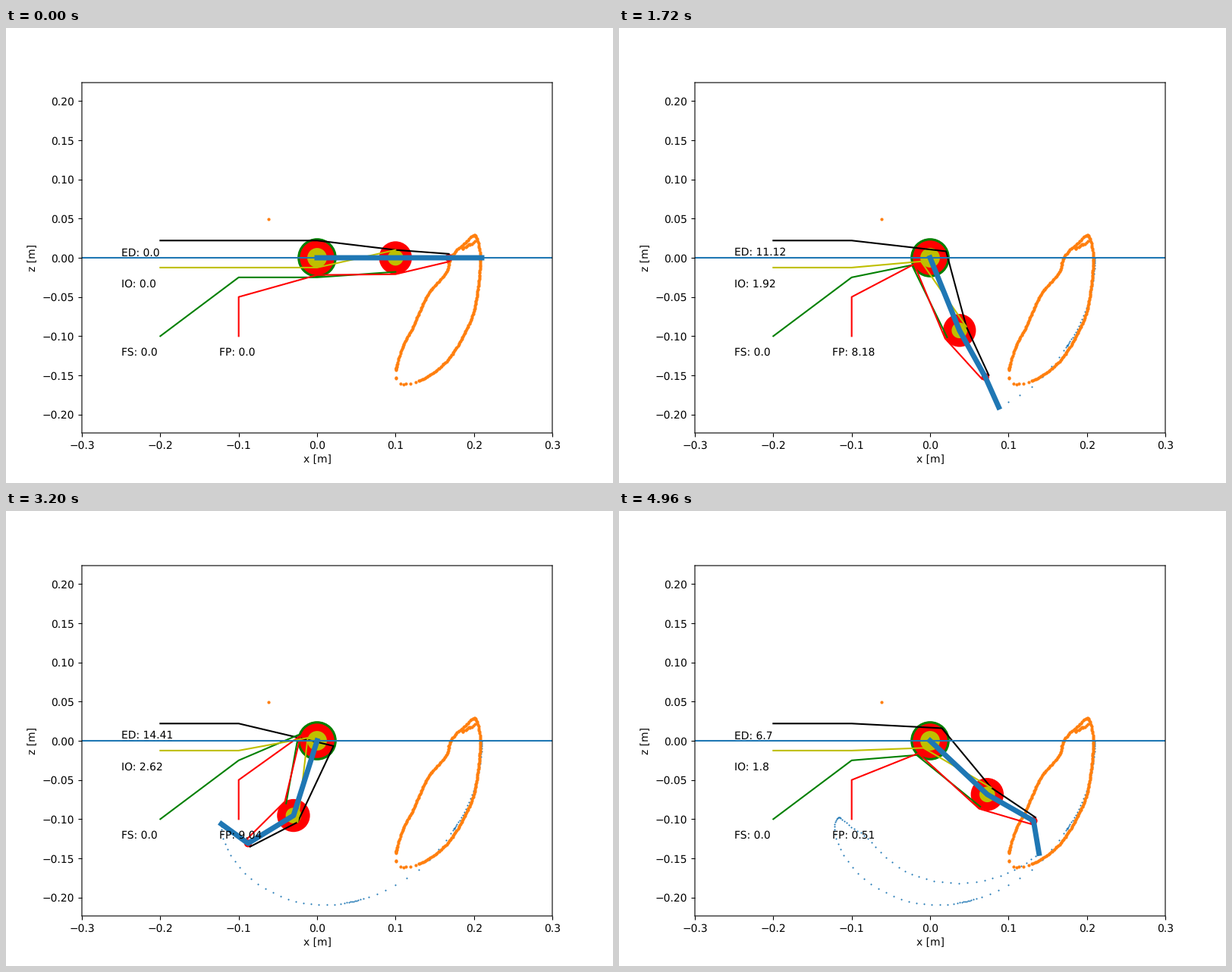
Write a matplotlib script that moves like this. It is 800 px wide and 600 px high and loops after 5000 ms.

```python
import numpy as np
import matplotlib.pyplot as plt
from matplotlib.animation import FuncAnimation
from matplotlib.patches import Circle

plt.rcParams.update({"path.snap": False, "text.hinting": "none"})

FRAMES, INTERVAL = 125, 40
SCALE = 620 / 0.6                      # pixels per metre
LENGTHS = (0.1, 0.068, 0.042)

# step, then absolute flexion of the three phalanges in degrees
POSES = [(0, 0, 0, 0), (31, 41, 25, 22), (35, 42.5, 26, 23), (43, 68, 61, 66),
         (46, 74, 72, 76), (56, 79.5, 80.5, 82.5), (62, 88, 94.5, 112),
         (80, 107.5, 148.5, 216), (86, 106, 152, 227), (96, 98, 133, 228),
         (106, 75.3, 95.7, 172), (124, 43.2, 29.7, 80.5)]

# step, then the forces ED, IO, FP
FORCES = [(0, 0, 0, 0), (31, 11.35, 2.87, 4.25), (43, 11.12, 1.92, 8.18),
          (62, 11.8, 1.39, 8.8), (80, 14.41, 2.62, 9.04),
          (106, 4.35, 1.55, -0.01), (124, 6.7, 1.8, 0.51)]

# corners of the reachable area in stage pixels
REACH = [(514, 449), (522, 422), (535, 397), (557, 350), (581, 320), (586, 303),
         (604, 284), (617, 273), (625, 303), (619, 364), (600, 411), (580, 440),
         (547, 464), (523, 470), (513, 459)]


def smooth(x, y, t):
    """Monotone cubic interpolation of every column of y."""
    h = np.diff(x)[:, None]
    d = np.diff(y, axis=0) / h
    m = np.zeros_like(y)
    same = d[:-1] * d[1:] > 0
    total = np.where(same, d[:-1] + d[1:], 1)
    m[1:-1] = np.where(same, 2 * d[:-1] * d[1:] / total, 0)
    m[-1] = d[-1] / 2
    i = np.clip(np.searchsorted(x, t, side="right") - 1, 0, len(x) - 2)
    w = h[i]
    u = (t[:, None] - x[i][:, None]) / w
    return ((1 + 2 * u) * (1 - u) ** 2 * y[i] + u * (1 - u) ** 2 * w * m[i]
            + u * u * (3 - 2 * u) * y[i + 1] + u * u * (u - 1) * w * m[i + 1])


def timeline(keys):
    keys = np.array(keys, float)
    return smooth(keys[:, 0], keys[:, 1:], np.arange(FRAMES, dtype=float))


def reach_dots():
    """Dots around the reachable area, thinned out at its lower left."""
    rng = np.random.default_rng(4)
    p = np.array(REACH + REACH[:1], float)
    s = np.r_[0, np.cumsum(np.hypot(*np.diff(p, axis=0).T))]
    dots = smooth(s, p, np.arange(0, s[-1], 1.8))
    thin = (dots[:, 0] < 545) & (dots[:, 1] > 451)
    dots = dots[rng.random(len(dots)) > 0.6 * thin]
    dots += rng.uniform(-0.3, 0.3, dots.shape)
    notch = np.linspace((601, 291), (617, 282), 12) + rng.uniform(-1, 1, (12, 2))
    dots = np.vstack([dots, notch, (345.5, 251.5)])
    return (dots - (410, 303)) * (1, -1) / SCALE


def joints(flexion):
    bones = [n * np.array([np.cos(a), -np.sin(a)])
             for n, a in zip(LENGTHS, flexion)]
    return np.vstack([(0, 0), np.cumsum(bones, axis=0)])


def normal(angle):
    return np.array([np.sin(angle), np.cos(angle)])


angles = np.radians(timeline(POSES))
forces = timeline(FORCES)
tips = np.array([joints(a)[3] for a in angles])

fig, ax = plt.subplots(figsize=(8, 6), dpi=100)
ax.set_xlim(-0.3, 0.3)
ax.set_ylim(-231 / SCALE, 231 / SCALE)
ax.set_xlabel("x [m]")
ax.set_ylabel("z [m]")

trail, = ax.plot([], [], "o", color="C0", ms=1.5, mew=0, zorder=0.9)
ax.scatter(*reach_dots().T, s=4, color="C1")


def disc(radius, color):
    return ax.add_patch(Circle((0, 0), radius, color=color, lw=0))


for radius, color in ((0.025, "g"), (0.022, "r"), (0.0125, "y")):
    disc(radius, color)
middle = [disc(0.021, "r"), disc(0.01, "y")]
outer = disc(0.005, "r")

# colour, fixed route, signed lever arm at each joint
TENDONS = [
    ("k", [(-0.2, 0.022), (-0.1, 0.022)], (0.022, 0.01, 0.005)),
    ("g", [(-0.2, -0.1), (-0.1, -0.025)], (-0.025, -0.018)),
    ("r", [(-0.1, -0.1), (-0.1, -0.05)], (-0.022, -0.021, -0.005)),
    ("y", [(-0.2, -0.0125), (-0.1, -0.0125)], (-0.0125, 0.01)),
]
cords = [ax.plot([], [], color=c)[0] for c, _, _ in TENDONS]
finger, = ax.plot([], [], color="C0", lw=5)
ax.axhline(0)

labels = {"ED": ax.text(-0.25, 0.0025, ""),
          "IO": ax.text(-0.25, -0.0375, ""),
          "FP": ax.text(-0.125, -0.125, "")}
ax.text(-0.25, -0.125, "FS: 0.0")


def draw(i):
    points = joints(angles[i])
    finger.set_data(*points.T)
    for patch in middle:
        patch.center = points[1]
    outer.center = points[2]

    first, second, _ = angles[i]
    for cord, (_, route, arms) in zip(cords, TENDONS):
        bends = [p + r * normal(a)
                 for p, r, a in zip(points, arms, (first, second, second))]
        cord.set_data(*np.array(route + bends).T)

    trail.set_data(*tips[:i].T)
    for (name, label), value in zip(labels.items(), forces[i]):
        label.set_text(f"{name}: {round(float(value), 2) + 0.0}")
    return [finger, trail, outer, *middle, *cords, *labels.values()]


anim = FuncAnimation(fig, draw, frames=FRAMES, interval=INTERVAL,
                     init_func=lambda: draw(0), repeat=True, repeat_delay=0)
plt.show()
```
